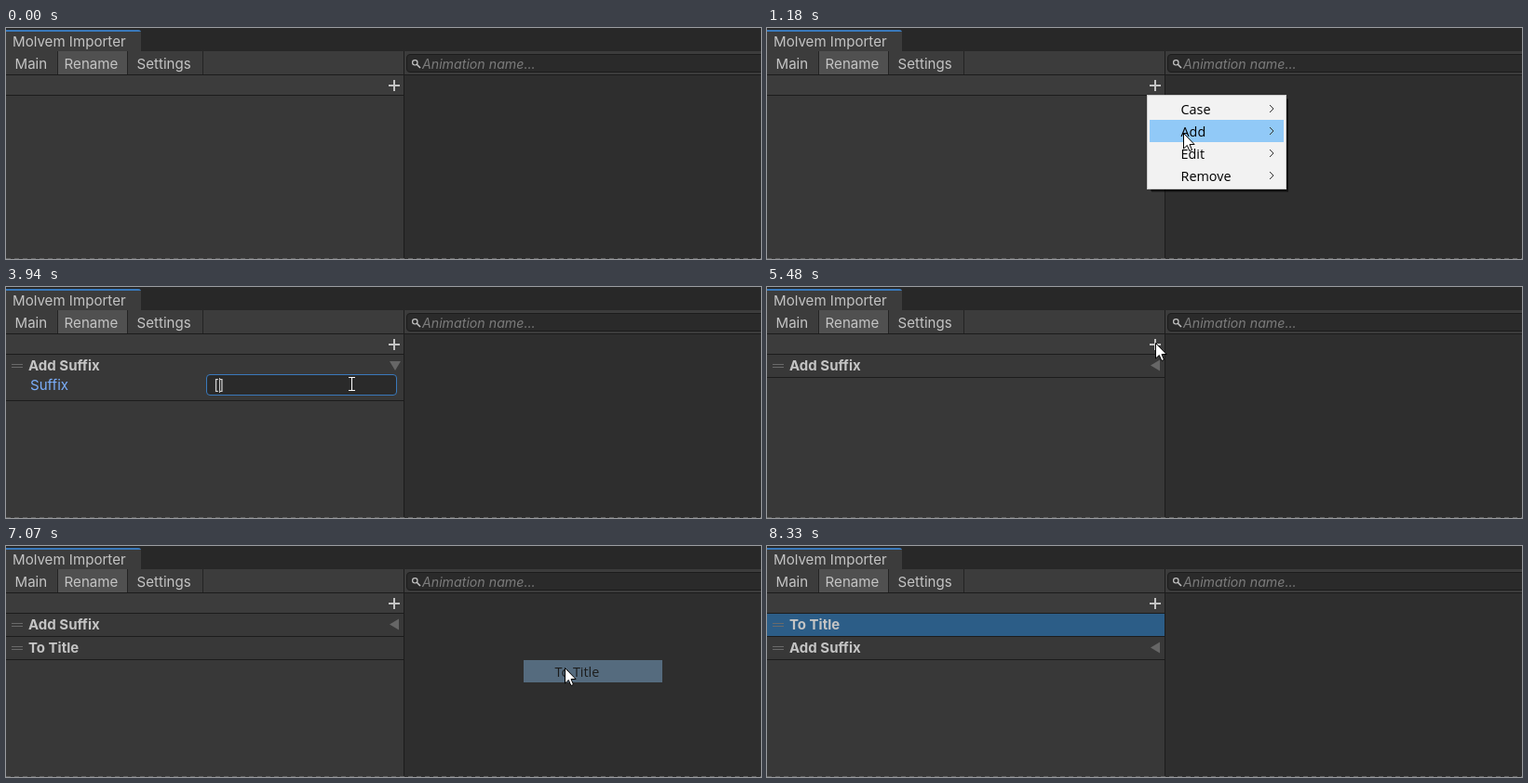
Animation, 811 px wide and 249 px high, one loop 9830 ms. Source, as an HTML page with a canvas:

```html
<!DOCTYPE html>
<html lang="en">
<head>
<meta charset="utf-8">
<title>Rename list</title>
<style>
html, body { margin: 0; width: 100%; height: 100%; overflow: hidden; background: #383838; }
canvas { display: block; width: 811px; height: 249px; }
</style>
</head>
<body>
<canvas id="stage" width="811" height="249"></canvas>
<script>
const W = 811, H = 249, LOOP = 9830, ROW = 25, ITEM = 24;
const UI = 'Inter, "Noto Sans", sans-serif';
const MENU = '14.4px "Open Sans", "Noto Sans", sans-serif';
const INK = '#c4c4c4', LINE = '#1c1c1c', BLUE = '#3a79bb', HOVER = '#91c9f7';

const stage = document.getElementById('stage').getContext('2d');
const layer = new OffscreenCanvas(W, H).getContext('2d');
let ctx = stage;

// when each action takes effect
const T = {
  enter: 220, menu1: 740, sub1: 1360, pick1: 1830, unfold: 2560, focus: 2970, fold: 4950,
  menu2: 5620, sub2: 6120, pick2: 6950, grab: 7545, drop: 7860, leave: 8330
};
const clicks = [T.menu1, T.pick1, T.unfold, T.focus, T.fold, T.menu2, T.sub2, T.pick2];
const keys = [[3480, ' '], [3670, '['], [3700, ']'], [3940, 'Left'], [4080, 'R'], [4220, 'u'], [4300, 'n']];

const plus = [417, 64], toggle = [417, 83], secondRow = [329, 108], firstRow = [329, 82];
const moves = [
  [200, plus],
  [900, [447, 113]],
  [1390, [582, 140]],
  [1860, [453, 113]],
  [2195, toggle],
  [2640, [371, 104]],
  [4580, toggle],
  [5030, [416, 53]],
  [5350, plus],
  [5740, [437, 75]],
  [6230, [560, 88]],
  [6555, [600, 131]],
  [7075, secondRow],
  [7560, firstRow],
  [7950, [456, 256]]
];

const clamp = v => Math.max(0, Math.min(1, v));
const ramp = (t, a, b) => clamp((t - a) / (b - a));
const ease = v => v * v * (3 - 2 * v);
const within = (t, a, b) => t >= a && t < b;

function rect(x, y, w, h, color) {
  ctx.fillStyle = color;
  ctx.fillRect(x, y, w, h);
}

function text(str, x, y, color = INK, font = '15.1px ' + UI) {
  ctx.font = font;
  ctx.fillStyle = color;
  ctx.fillText(str, x, y);
}

function shape(points, fill, stroke, width = 1) {
  ctx.beginPath();
  points.forEach(([x, y], i) => i ? ctx.lineTo(x, y) : ctx.moveTo(x, y));
  if (fill) {
    ctx.closePath();
    ctx.fillStyle = fill;
    ctx.fill();
  }
  if (stroke) {
    ctx.strokeStyle = stroke;
    ctx.lineWidth = width;
    ctx.stroke();
  }
}

function field(x, y, w, h, border) {
  ctx.beginPath();
  ctx.roundRect(x + .5, y + .5, w - 1, h - 1, 3.5);
  ctx.fillStyle = '#2a2a2a';
  ctx.fill();
  ctx.strokeStyle = border;
  ctx.lineWidth = 1;
  ctx.stroke();
}

// paint as one group with a shared opacity
function fade(alpha, paint) {
  if (alpha <= 0) return;
  layer.clearRect(0, 0, W, H);
  ctx = layer;
  paint();
  ctx = stage;
  ctx.globalAlpha = alpha;
  ctx.drawImage(layer.canvas, 0, 0);
  ctx.globalAlpha = 1;
}

// longer trips take longer
function pointerAt(t) {
  let pos = [396, 244];
  for (const [start, goal] of moves) {
    if (t < start) break;
    const [dx, dy] = [goal[0] - pos[0], goal[1] - pos[1]];
    const k = ease(ramp(t, start, start + 200 + Math.hypot(dx, dy)));
    pos = [pos[0] + dx * k, pos[1] + dy * k];
  }
  return pos;
}

function typed(t) {
  let value = '', caret = 0;
  for (const [at, key] of keys) {
    if (t < at) break;
    if (key === 'Left') caret--;
    else {
      value = value.slice(0, caret) + key + value.slice(caret);
      caret++;
    }
  }
  return [value, caret];
}

function drawWindow() {
  rect(0, 0, W, H, '#383838');
  rect(0, 0, W, 25, '#282828');
  ctx.save();
  ctx.beginPath();
  ctx.roundRect(-5, 2, 150, 30, 3);
  ctx.clip();
  rect(0, 2, 145, 23, '#3c3c3c');
  rect(0, 2, 145, 2, BLUE);
  ctx.restore();
  text('Molvem Importer', 7, 20);

  rect(0, 25, W, 25, '#3c3c3c');
  rect(56, 25, 74, 25, '#505050');
  for (const x of [55, 130, 211]) rect(x, 25, 1, 25, '#232323');
  text('Main', 9.5, 44);
  text('Rename', 62.6, 44);
  text('Settings', 140.6, 44);

  rect(0, 51, 427, 21, '#3c3c3c');
  rect(0, 50, W, 1, LINE);
  rect(0, 72, 427, 1, LINE);
  rect(411, 61, 12, 2, INK);
  rect(416, 56, 2, 12, INK);

  rect(428, 51, 383, 198, '#2e2e2e');
  rect(427, 25, 1, 224, LINE);
  field(430, 28, 390, 20, '#1c1c1c');
  ctx.beginPath();
  ctx.arc(439.3, 37.3, 2.7, 0, 7);
  ctx.strokeStyle = INK;
  ctx.lineWidth = 1.2;
  ctx.stroke();
  shape([[441.3, 39.3], [445, 43]], null, INK, 1.6);
  text('Animation name...', 447, 44, '#7b7b7b', 'italic 14.2px ' + UI);

  for (let x = 0; x < W; x += 9) rect(x, 248, 5, 1, '#606060');
}

function drawRow(name, y, selected) {
  rect(0, y, 427, ROW, selected ? '#2c5d87' : '#383838');
  rect(0, y + ROW - 1, 427, 1, LINE);
  for (const dy of [10, 13]) rect(6, y + dy, 12, 1, '#6a6a6a');
  text(name, 24, y + 17, INK, '700 15px ' + UI);
}

function drawSuffixBody(t) {
  rect(0, 97, 427, ROW, '#383838');
  rect(0, 122, 427, 1, LINE);
  const focus = within(t, T.focus, T.fold);
  text('Suffix', 26, 111, focus ? '#7baefa' : INK);
  field(215, 94, 205, 23, focus ? BLUE : '#212121');
  const [value, caret] = typed(t);
  text(value, 219, 111, '#d2d2d2');
  if (focus) rect(Math.round(219 + ctx.measureText(value.slice(0, caret)).width), 98, 1, 16, INK);
}

function drawList(t, py) {
  if (t < T.pick1) return;
  const open = within(t, T.unfold, T.fold);
  const held = t >= T.grab;
  const [low, high] = [secondRow[1], firstRow[1]];
  const lift = t >= T.drop ? 1 : held ? clamp((low - py) / (low - high)) : 0;
  const y = 73 + ROW * ease(ramp(lift, .3, .9));
  const cy = y + 11.5;

  drawRow('Add Suffix', y, false);
  if (open) shape([[412, 80], [424, 80], [418, 90]], '#666');
  else shape([[422, cy - 6], [422, cy + 6], [412, cy]], '#666');
  if (open) drawSuffixBody(t);
  if (t >= T.pick2) drawRow('To Title', 73 + ROW * (1 - lift), held);
}

function drawItem(name, x, top, w, lit) {
  if (lit) rect(x + 3, top, w - 6, ITEM, HOVER);
  text(name, x + 36.5, top + 18, '#000', MENU);
}

function drawMenu(x, y, w, items, hover, arrows) {
  const h = items.length * ITEM + 6;
  for (const d of [3, 2]) rect(x + 2 + d, y + 2 + d, w - 4 + (d > 2 ? 1 : 2), h - 2, 'rgba(0,0,0,.35)');
  rect(x, y, w, h, '#cccccc');
  rect(x + 1, y + 1, w - 2, h - 2, '#f2f2f2');
  items.forEach((name, i) => {
    const top = y + 3 + i * ITEM;
    drawItem(name, x, top, w, i === hover);
    if (!arrows) return;
    const cx = x + 132, cy = top + 12;
    shape([[cx, cy - 4], [cx + 4, cy], [cx, cy + 4]], null, '#333', 1);
  });
}

// one visit to the menu: open, show a submenu, pick an item
function drawVisit(t, [px, py], open, sub, pick, parent, items) {
  const y = 72 + parent * ITEM, w = items[0].length > 6 ? 156 : 132;
  const row = Math.floor((py - 75) / ITEM), last = items.length - 1;
  if (within(t, open, pick)) {
    const hover = t >= sub ? parent : row;
    const subHover = px > 555 ? row - parent : -1;
    fade(ramp(t, open - 20, open + 100), () =>
      drawMenu(408, 72, 150, ['Case', 'Add', 'Edit', 'Remove'], hover, true));
    fade(ramp(t, sub, sub + 82), () => drawMenu(553, y, w, items, subHover));
  } else if (t >= pick) {
    fade(1 - ramp(t, pick, pick + 200), () =>
      drawItem(items[last], 553, y + 3 + last * ITEM, w - 1, true));
  }
}

function drawBeam(x, y) {
  rect(x, y - 7, 1, 15, '#fff');
  for (const dy of [-7, 7]) {
    rect(x - 3, y + dy, 3, 1, '#fff');
    rect(x + 1, y + dy, 3, 1, '#fff');
  }
}

function drawArrow(x, y) {
  const arrow = [[0, 0], [0, 16.5], [3.8, 13], [6.4, 19], [9, 17.9], [6.5, 12], [11.6, 12], [0, 0]];
  shape(arrow.map(([dx, dy]) => [x + .5 + dx, y + .5 + dy]), '#fff', '#000');
}

function drawPointer(t, pos) {
  if (!within(t, T.enter, T.leave)) return;
  const [x, y] = pos.map(Math.round);
  const overField = x > 215 && x < 410 && y > 94 && y < 117;
  if (within(t, T.unfold, T.fold) && overField) drawBeam(x, y);
  else drawArrow(x, y);
  if (within(t, T.grab, T.drop) || clicks.some(c => within(t, c - 30, c + 60))) {
    ctx.beginPath();
    ctx.arc(x, y, 15, 0, 7);
    ctx.fillStyle = 'rgba(255,240,20,.58)';
    ctx.fill();
  }
}

function draw(t) {
  const pos = pointerAt(t);
  drawWindow();
  drawList(t, pos[1]);
  drawVisit(t, pos, T.menu1, T.sub1, T.pick1, 1, ['Prefix', 'Suffix']);
  drawVisit(t, pos, T.menu2, T.sub2, T.pick2, 0, ['To Upper', 'To Lower', 'To Title']);
  drawPointer(t, pos);
}

const began = performance.now();
function tick() {
  draw((performance.now() - began) % LOOP);
  requestAnimationFrame(tick);
}
tick();
</script>
</body>
</html>
```
